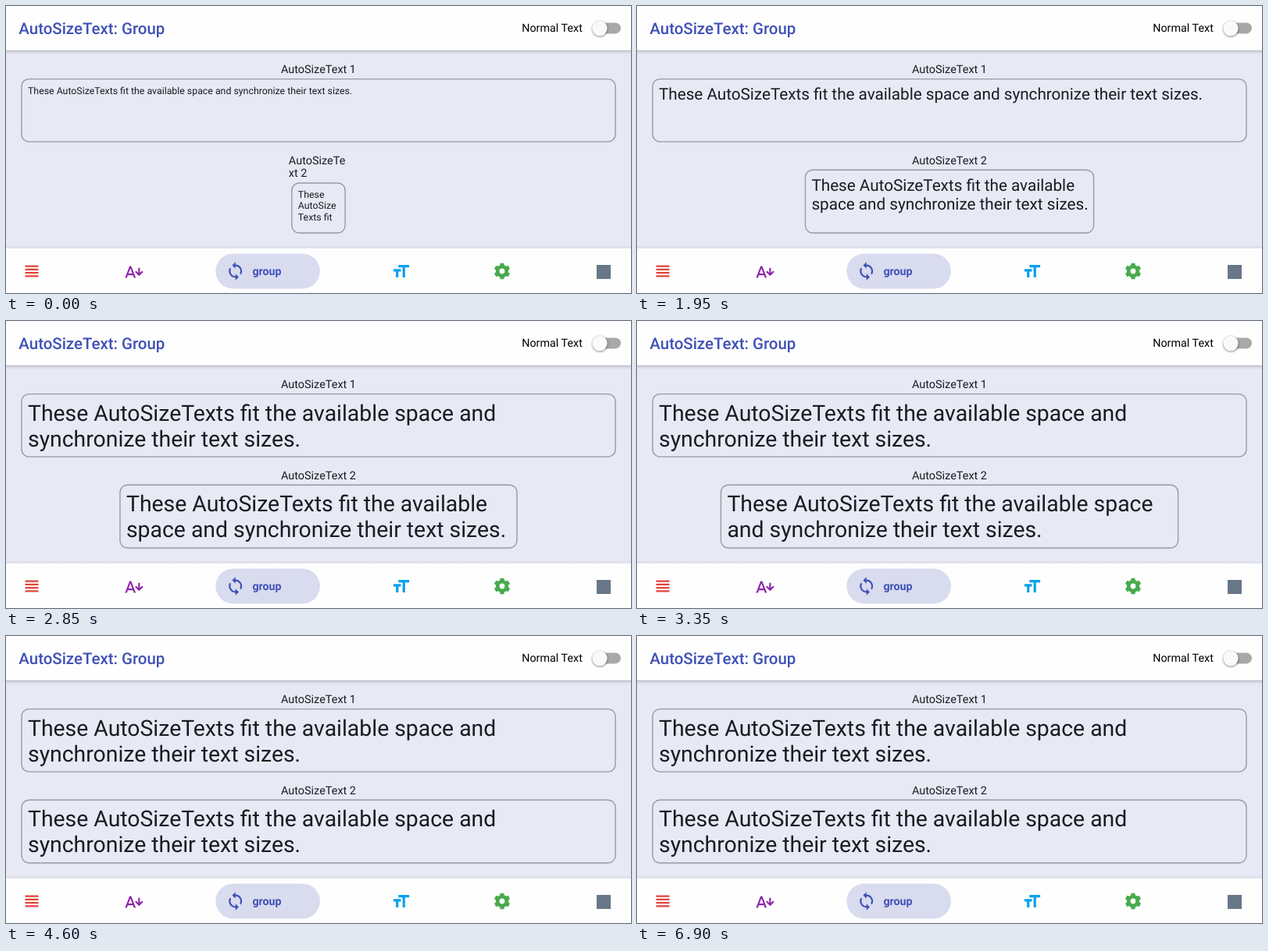
These frames come from a looping animation (800x368 px, 7.55 s). An HTML page:

```html
<!DOCTYPE html>
<html lang="en">
<head>
<meta charset="utf-8">
<title>AutoSizeText: Group</title>
<style>
  html, body { margin: 0; width: 100%; height: 100%; overflow: hidden; background: #e7e9f5; }
  svg { display: block; width: 100%; height: 100%; }
  text { font-family: Roboto, sans-serif; fill: #1b1b20; text-rendering: geometricPrecision; white-space: pre; }
  .box { fill: none; stroke: #9a9a9e; stroke-width: 1.4; }
</style>
</head>
<body>
<svg viewBox="0 0 800 368" preserveAspectRatio="none">
  <defs>
    <linearGradient id="below" x2="0" y2="1">
      <stop offset="0" stop-color="#555" stop-opacity=".38"/>
      <stop offset=".4" stop-color="#555" stop-opacity=".12"/>
      <stop offset="1" stop-color="#555" stop-opacity="0"/>
    </linearGradient>
    <linearGradient id="above" x2="0" y2="1">
      <stop offset="0" stop-color="#555" stop-opacity="0"/>
      <stop offset="1" stop-color="#555" stop-opacity=".12"/>
    </linearGradient>
    <radialGradient id="halo">
      <stop offset=".7" stop-color="#333" stop-opacity=".42"/>
      <stop offset="1" stop-color="#333" stop-opacity="0"/>
    </radialGradient>
  </defs>

  <rect width="800" height="368" fill="#e7e9f5"/>
  <rect y="56.5" width="800" height="6" fill="url(#below)"/>
  <rect width="800" height="56.7" fill="#fefefe"/>
  <text x="16.3" y="36" font-size="20.45" font-weight="500" style="fill:#3f51b5">AutoSizeText: Group</text>
  <text x="660.2" y="33.4" font-size="14.35" style="fill:#000">Normal Text</text>
  <rect x="755" y="21.4" width="32" height="14" rx="7" fill="#a8a8a8"/>
  <circle cx="760.2" cy="29.6" r="12" fill="url(#halo)"/>
  <circle cx="760" cy="28.6" r="9.6" fill="#fafafa"/>

  <rect class="box" x="20" y="93.6" width="760" height="80.5" rx="9.4"/>
  <rect class="box" id="box2" rx="9.4"/>
  <g id="copy"></g>

  <rect y="307" width="800" height="4" fill="url(#above)"/>
  <rect y="310.7" width="800" height="57.3" fill="#fefefe"/>
  <rect x="268.3" y="317.5" width="133.6" height="45" rx="22.5" fill="#d9dbef"/>
  <text x="315.5" y="345" font-size="14.2" font-weight="700" style="fill:#3f51b5">group</text>
  <g id="icons"></g>
  <rect x="756" y="332" width="18" height="18" fill="#687788"/>
</svg>
<script>
const LOOP = 7550, STEP = 50;
const LINE = 1.166, ASCENT = 0.928;
const MIN_SIZE = 12.34, MAX_SIZE = 28.38, SIZE_STEP = 0.05;
const LABEL_SIZE = 14.45, PAD_X = 8, PAD_Y = 7.6;
const TEXT = 'These AutoSizeTexts fit the available space and synchronize their text sizes.';

const byId = id => document.getElementById(id);

// Icons on a 24-unit grid: centre x, centre y, colour, path
const icons = [
  [33, 340, '#e2433d', 'M4 15h16v-2H4zM4 19h16v-2H4zM4 11h16V9H4zM4 5v2h16V5z'],
  [164, 341, '#8e24aa', 'M5.12 14 7.5 7.67 9.87 14M6.5 5 1 19h2.25l1.12-3h6.25l1.13 3H14L8.5 5zM18 17l5-5.07-1.41-1.43L19 13.1V7h-2v6.1l-2.59-2.6L13 11.93z'],
  [293.7, 340, '#3f51b5', 'M12 4V1L8 5l4 4V6a6 6 0 0 1 5.24 8.8l1.46 1.46A8 8 0 0 0 12 4zM12 18a6 6 0 0 1-5.24-8.8L5.3 7.74A8 8 0 0 0 12 20v3l4-4-4-4z'],
  [505.5, 340.5, '#03a0ec', 'M3 12h3v7h3v-7h3V9H3zM9 4v3h5v12h3V7h5V4z']
];

// A ring with a hub hole and six blunt teeth
function gearPath() {
  const at = (r, a) => (12 + r * Math.sin(a)).toFixed(2) + ' ' + (12 - r * Math.cos(a)).toFixed(2);
  const edge = [];
  for (let i = 0; i < 6; i++) {
    const a = i * Math.PI / 3;
    edge.push(at(7.7, a - 0.34), at(9.9, a - 0.23), at(9.9, a + 0.23), at(7.7, a + 0.34));
  }
  return 'M12 8.8a3.2 3.2 0 1 0 0 6.4a3.2 3.2 0 1 0 0-6.4zM' + edge.join('L') + 'z';
}
icons.push([635, 340, '#48aa4d', gearPath()]);

byId('icons').innerHTML = icons.map(([x, y, color, d]) =>
  `<path transform="translate(${x} ${y}) scale(1.06) translate(-12 -12)" fill="${color}" fill-rule="evenodd" d="${d}"/>`
).join('');

const pen = document.createElement('canvas').getContext('2d');
const cache = {};
function ems(s) {
  if (!(s in cache)) {
    pen.font = '100px Roboto, sans-serif';
    cache[s] = pen.measureText(s).width / 100;
  }
  return cache[s];
}

// Greedy wrap; words wider than a line break between letters
function wrap(text, size, width) {
  const max = width / size, lines = [];
  let line = '';
  for (let word of text.split(' ')) {
    const joined = line ? line + ' ' + word : word;
    if (ems(joined) <= max) { line = joined; continue; }
    if (line) lines.push(line);
    while (ems(word) > max && word.length > 1) {
      let n = word.length - 1;
      while (n > 1 && ems(word.slice(0, n)) > max) n--;
      lines.push(word.slice(0, n));
      word = word.slice(n);
    }
    line = word;
  }
  return lines.concat(line);
}

function fitSize(width, height) {
  for (let size = MAX_SIZE; size > MIN_SIZE; size -= SIZE_STEP) {
    if (wrap(TEXT, size, width).length * size * LINE <= height) return size;
  }
  return MIN_SIZE;
}

function textLines(lines, x, top, size) {
  return lines.map((s, i) =>
    `<text x="${x.toFixed(2)}" y="${(top + (i * LINE + ASCENT) * size).toFixed(2)}" font-size="${size.toFixed(3)}">${s}</text>`
  ).join('');
}

function block(x, y, width, height, size) {
  const room = Math.floor(height / (size * LINE) + 0.01);
  return textLines(wrap(TEXT, size, width).slice(0, room), x + PAD_X, y + PAD_Y, size);
}

function label(text, top, width) {
  const lines = wrap(text, LABEL_SIZE, width);
  const w = lines.length > 1 ? width : ems(text) * LABEL_SIZE;
  return { count: lines.length, svg: textLines(lines, 400 - w / 2, top, LABEL_SIZE) };
}

function draw(ms) {
  const t = Math.floor(ms / STEP) * STEP / 1000;
  const width = Math.min(760, 68.3 + 154.3 * t);
  const left = 400 - width / 2;
  const first = label('AutoSizeText 1', 72.2, 768);
  const second = label('AutoSizeText 2', 189.2, width + 8);
  const shift = (second.count - 1) * LABEL_SIZE * LINE;
  const top = 210.2 + shift, height = 80.8 - shift;
  const inner = width - 14.6, room = height - 14;
  const size = fitSize(inner, room);

  const box = byId('box2');
  box.setAttribute('x', left);
  box.setAttribute('y', top);
  box.setAttribute('width', width);
  box.setAttribute('height', height);
  byId('copy').innerHTML = first.svg + second.svg +
    block(20, 93.6, 745.4, 66.8, size) + block(left, top, inner, room, size);
}

const start = performance.now();
function tick() {
  draw((performance.now() - start) % LOOP);
  requestAnimationFrame(tick);
}
tick();
</script>
</body>
</html>
```
